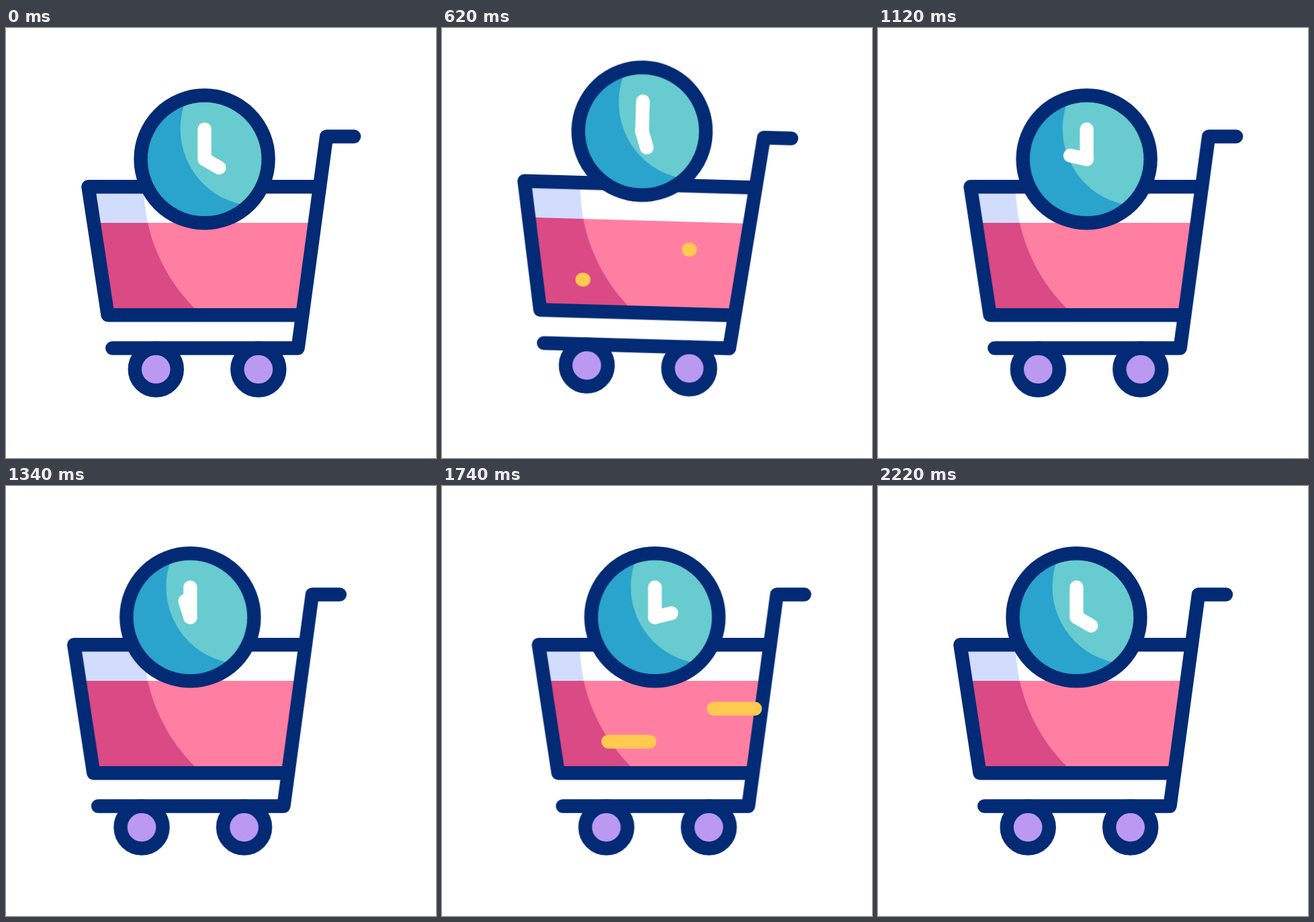
These frames come from a looping animation (640 by 640 pixels, 2.4 s). An HTML page without scripts:

```html
<!DOCTYPE html>
<html lang="en">
<head>
<meta charset="utf-8">
<title>Cart and clock</title>
<style>
@property --dx { syntax: "<length>"; inherits: true; initial-value: 0px; }

html, body { margin: 0; width: 100%; height: 100%; overflow: hidden; background: #fff; }
svg { display: block; width: 100%; height: 100%; }

.tilt, .rise, .hour, .dash {
  animation: 2400ms cubic-bezier(.333, 0, .667, 1) infinite;
}
.tilt {
  transform-origin: 420px 265px;
  animation-name: tilt, drive;
  animation-duration: 2400ms;
}
.rise { animation-name: rise; }
.hour { transform-origin: 295.5px 195.3px; animation-name: hour; }
.dash { stroke-dasharray: 97 300; animation-name: dash; }
.lines { animation: show 2400ms step-end infinite; }

.move { transform: translateX(var(--dx)); }
.stay { transform: translateX(calc(-1 * var(--dx))); }

.ink { fill: none; stroke: #032a75; }
.ink, .hand, .lines { stroke-width: 20.4; stroke-linecap: round; stroke-linejoin: round; }
.hand { fill: none; stroke: #fff; }
.lines { fill: none; stroke: #ffca4f; }
.wheel { fill: #bb99f2; }

@keyframes drive {
  0%, 8.33%, 15% { --dx: 0px; }
  20.4% { --dx: 6px; }
  29.8% { --dx: -5px; }
  41.33% { --dx: 27px; }
  58.71% { --dx: -25px; }
  76.08%, 79.17% { --dx: 27px; }
  92.3%, 100% { --dx: 0px; }
}
@keyframes tilt {
  0%, 8.33%, 30.8%, 76.08%, 92.5%, 100% { transform: rotate(0deg); }
  19.58% { transform: rotate(4deg); }
  82.08% { transform: rotate(5deg); }
}
@keyframes rise {
  0%, 8.33%, 44.83%, 100% { transform: translateY(0); }
  16.67%, 31.67% { transform: translateY(-38px); }
}
@keyframes hour {
  0%, 8.33% { transform: rotate(0deg); }
  90.42%, 100% { transform: rotate(360deg); }
}
@keyframes dash {
  0%, 8.33% { stroke-dashoffset: 97; }
  17.5% { stroke-dashoffset: 0; }
  26.67% { stroke-dashoffset: -97; }
  67.1% { stroke-dashoffset: 97; }
  76.3% { stroke-dashoffset: 0; }
  85.4%, 100% { stroke-dashoffset: -97; }
}
@keyframes show {
  0%, 26.6%, 85.3%, 100% { opacity: 0; }
  8.5%, 67.3% { opacity: 1; }
}
</style>
</head>
<body>
<svg viewBox="0 0 640 640">
  <defs>
    <clipPath id="basket"><path d="M122.4 236.3H467L441 427.3H151.5Z"/></clipPath>
    <clipPath id="light"><circle cx="462" cy="235" r="257"/></clipPath>
    <clipPath id="face"><circle cx="295.5" cy="195.3" r="90"/></clipPath>
  </defs>

  <g class="tilt">
    <g class="move">
      <!-- basket: the shading stays put while the cart slides over it -->
      <g clip-path="url(#basket)">
        <g class="stay">
          <path fill="#d2dcfd" d="M0 200H640V290H0Z"/>
          <path fill="#da4a85" d="M0 290H640V440H0Z"/>
          <g clip-path="url(#light)">
            <path fill="#fff" d="M0 200H640V290H0Z"/>
            <path fill="#ff7fa2" d="M0 290H640V440H0Z"/>
          </g>
        </g>
      </g>
      <circle class="ink wheel" cx="223.2" cy="508" r="31.5" style="fill:#bb99f2"/>
      <circle class="ink wheel" cx="375.7" cy="508" r="31.5" style="fill:#bb99f2"/>
      <path class="ink" d="M467 236.3H122.4L151.5 427.3H441"/>
      <path class="ink" d="M518 161.5H477L434.5 476.5H158.2"/>

      <g class="rise">
        <g clip-path="url(#face)">
          <path fill="#2aa3cd" d="M200 100H400V300H200Z"/>
          <circle fill="#67cbd0" cx="374.6" cy="150" r="115.1"/>
        </g>
        <circle class="ink" cx="295.5" cy="195.3" r="95"/>
        <path class="hand" d="M295.5 150.7V195.3"/>
        <path class="hand hour" d="M295.5 195.3L317.3 207.9"/>
      </g>
    </g>

    <g class="lines">
      <path class="dash" d="M466 331.5H369"/>
      <path class="dash" d="M309 380.5H212"/>
    </g>
  </g>
</svg>
</body>
</html>
```
